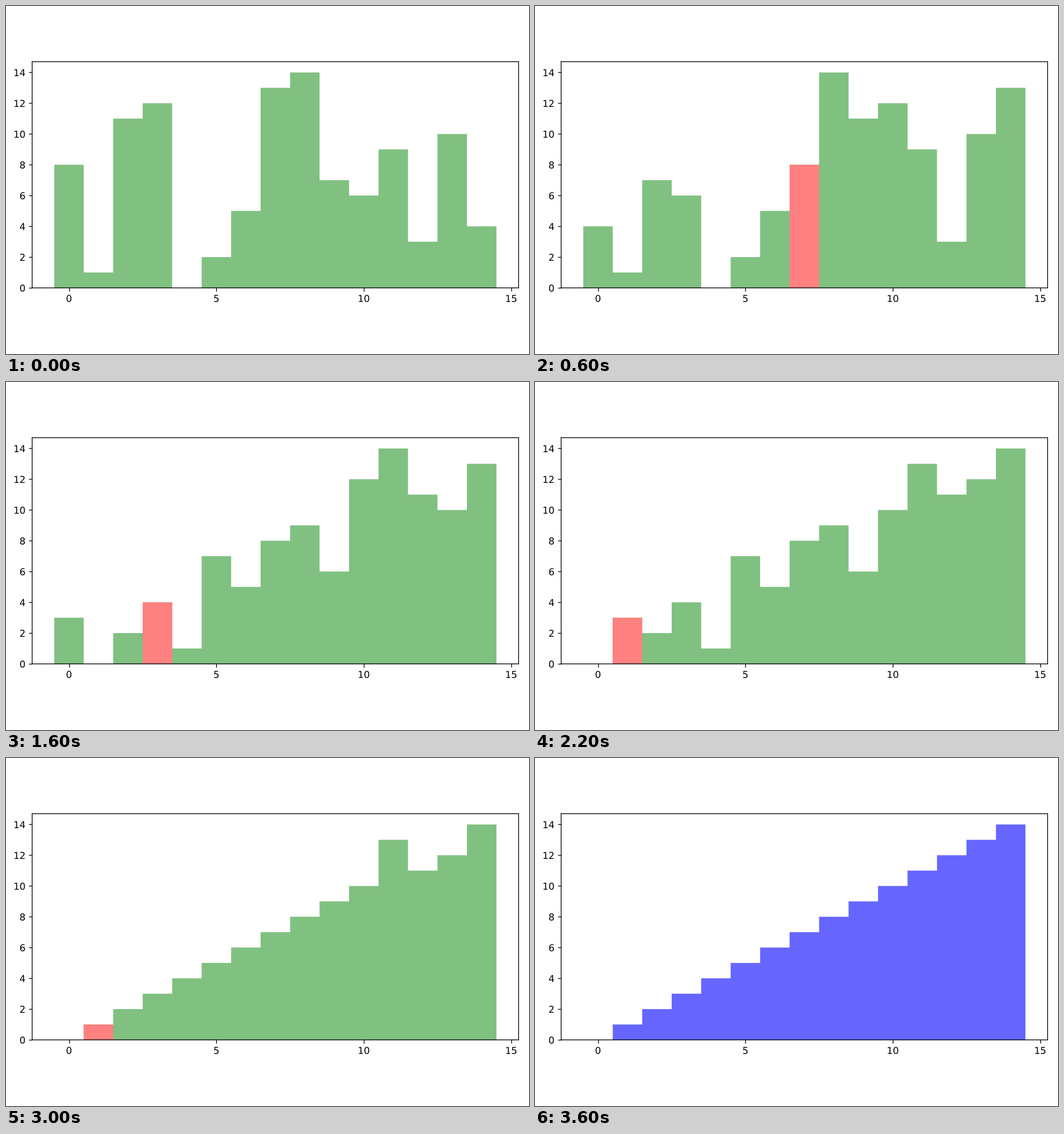
Recreate the animation shown at these times as a matplotlib script. Size 918 by 610 pixels, loop 3800 ms.

```python
import numpy as np
import matplotlib.pyplot as plt
from matplotlib.animation import FuncAnimation
from matplotlib.patheffects import Normal

W, H, DPI = 918, 610, 120
GREEN, RED, BLUE = "#80c080", "#ff8080", "#6666ff"
START = [8, 1, 11, 12, 0, 2, 5, 13, 14, 7, 6, 9, 3, 10, 4]

# Draw text, ticks and lines as plain paths at sub-pixel positions.
plt.rcParams.update({
    "path.snap": False,
    "path.effects": [Normal()],
    "text.hinting": "none",
})


def shell_sort(data):
    """Yield (values, gap) after each insertion that moved something."""
    a = list(data)
    gap = len(a) // 2
    while gap:
        for i in range(gap, len(a)):
            value, j = a[i], i
            while j >= gap and a[j - gap] > value:
                a[j] = a[j - gap]
                j -= gap
            if j != i:
                a[j] = value
                yield a[:], gap
        gap //= 2


steps = [(START, None), *shell_sort(START)]
steps.append((sorted(START), None))

# The small excess keeps the pixel size from rounding down.
fig = plt.figure(figsize=((W + 0.01) / DPI, (H + 0.01) / DPI), dpi=DPI,
                 facecolor="white")
ax = fig.add_axes([0.05, 0.19, 0.93, 0.65])
n = len(START)
edges = np.arange(n + 1) - 0.5
bars = ax.stairs(START, edges, fill=True, color=GREEN, lw=0)
mark = ax.stairs([0], [0, 1], fill=True, color=RED, lw=0)
ax.set_xlim(-1.25, n + 0.25)
ax.set_ylim(0, 14.7)
ax.set_xticks(range(0, 16, 5))
ax.set_yticks(range(0, 15, 2))


def draw(frame):
    values, gap = steps[frame]
    bars.set_data(values, edges)
    bars.set_facecolor(BLUE if frame == len(steps) - 1 else GREEN)
    mark.set_visible(gap is not None)
    if gap is not None:
        mark.set_data([values[gap]], edges[gap:gap + 2])
    return bars, mark


anim = FuncAnimation(fig, draw, frames=len(steps), interval=200,
                     repeat=True, repeat_delay=0)
plt.show()
```
